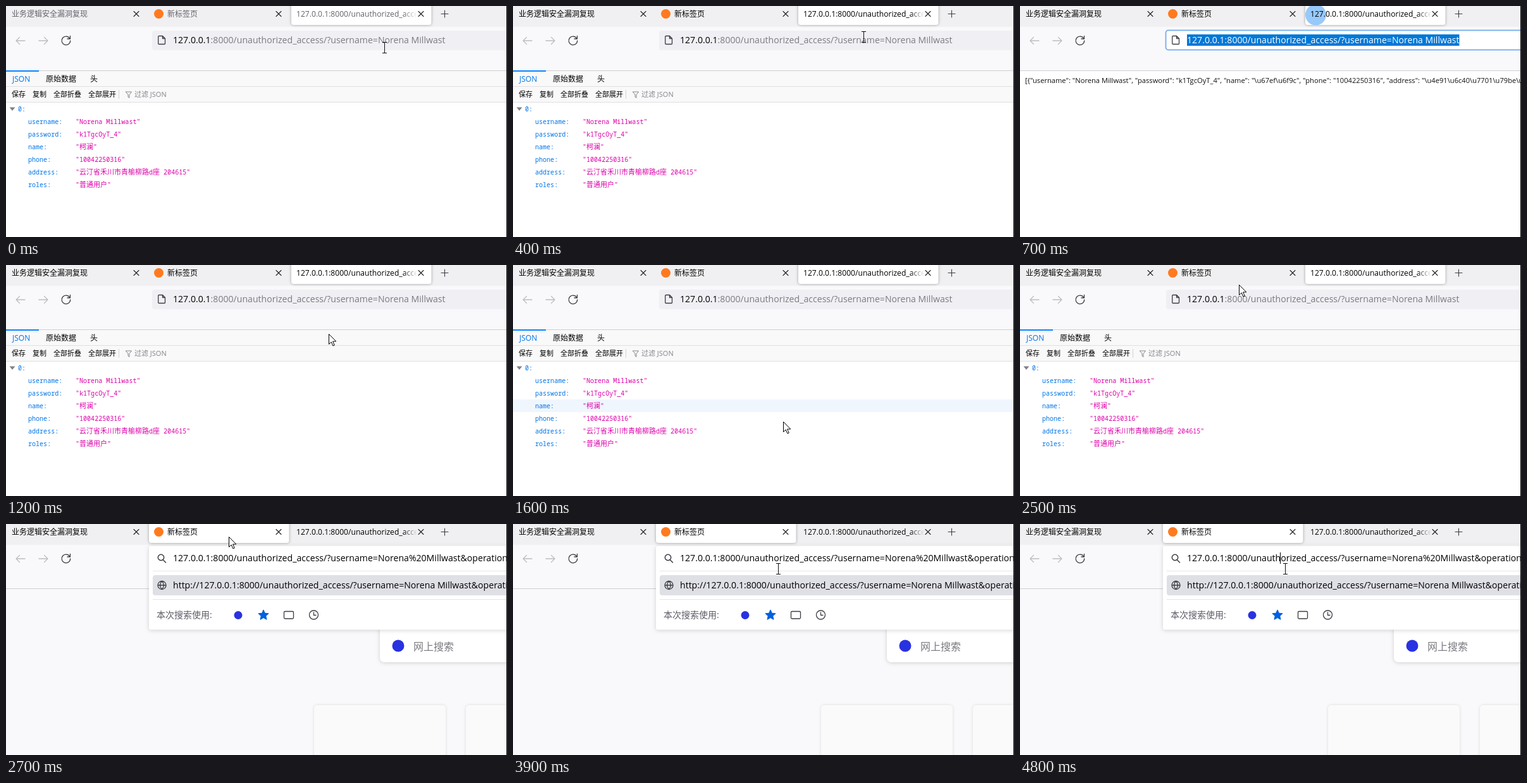
An HTML page that plays this animation: 792x366 px, repeating every 5 s.

```html
<!DOCTYPE html>
<html lang="zh-CN">
<head>
<meta charset="utf-8">
<title>JSON</title>
<style>
  html, body { margin: 0; width: 100%; height: 100%; overflow: hidden; background: #fff; }
  svg { display: block; font-family: "Open Sans", "Noto Sans CJK SC", "Noto Sans CJK", sans-serif; }
  text { white-space: pre; }
  .mono { font-family: "Noto Sans Mono", "Noto Sans CJK SC", "Noto Sans CJK", monospace; }
  .shadow { filter: drop-shadow(0 0 2px rgba(0, 0, 0, .35)); }
  .soft { filter: drop-shadow(0 1px 3px rgba(0, 0, 0, .17)); }
  .faint { filter: drop-shadow(0 0 2px rgba(0, 0, 0, .12)); }
  .icon { fill: none; stroke: #3c3c44; stroke-width: 1.3; stroke-linecap: round; stroke-linejoin: round; }
</style>
</head>
<body>
<svg id="stage" width="792" height="366" viewBox="0 0 792 366"></svg>
<script>
const INK = '#000', GRAY = '#7a7a80', BLUE = '#0074e8', PINK = '#dd00a9', SEARCH = '#2932e1';
const LOOP = 5000, STEP = 100;

const text = (x, y, s, size = 12, fill = INK, more = '') =>
  `<text x="${x}" y="${y}" font-size="${size}" fill="${fill}" ${more}>${s}</text>`;
const rect = (x, y, w, h, fill, more = '') =>
  `<rect x="${x}" y="${y}" width="${w}" height="${h}" fill="${fill}" ${more}/>`;
const icon = (d, more = '') => `<path class="icon" d="${d}" ${more}/>`;
const circle = (x, y, r, fill, more = '') => `<circle cx="${x}" cy="${y}" r="${r}" fill="${fill}" ${more}/>`;
const group = (id, body) => `<g id="${id}">${body}</g>`;

const person = 'Norena Millwast';
const phone = '10042250316';
const host = '127.0.0.1';
const path = ':8000/unauthorized_access/?username=';

const activeTab = x => rect(x, -6, 221.5, 36, '#fff', 'rx="4" class="shadow"');
const closeMark = x => icon(`M${x - 4} 8.5l8 8m0-8l-8 8`, 'style="stroke:#222;stroke-width:1.1"');

const base = rect(0, 0, 792, 366, '#fff') + rect(0, 0, 792, 33, '#f0f0f2') + rect(0, 33, 792, 69, '#f9f9fb');

const tabs = group('titles',
    text(9, 17, '业务逻辑安全漏洞复现', 12, 'inherit') +
    text(255, 17, '新标签页', 12, 'inherit') +
    `<g mask="url(#fade)">${text(459, 17, host + ':8000/unauthorized_access', 12.1, 'inherit')}</g>`) +
  [206, 431, 656].map(closeMark).join('') +
  circle(241.5, 12.5, 7.5, '#ff7a1f') +
  icon('M688 12.5h11m-5.5-5.5v11', 'style="stroke-width:1.1"');

const nav =
  icon('M30 55H16m5.5-5.5L16 55l5.5 5.5M52 55h14m-5.5-5.5L66 55l-5.5 5.5', 'style="stroke:#bdbdc2"') +
  icon('M100.5 51a6.8 6.8 0 1 0 1.2 4M101.5 47.5v4.5h-4.5') +
  rect(0, 102, 792, 1, '#cfcfd3');

const pageIcon = icon('M242 47.5h5.5l4 4v8q0 1-1 1h-8.5q-1.3 0-1.3-1v-11q0-1 1.3-1zM247.5 47.5v4h4');

const jsonRows = [
  ['username', person], ['password', 'k1TgcOyT_4'], ['name', '柯澜'], ['phone', phone],
  ['address', '云汀省禾川市青榆柳路d座 204615'], ['roles', '普通用户']
];
const wideHan = s => s.replace(/[\u4e00-\u9fff]+/g, '<tspan font-size="11">$&</tspan>');
const mono = (x, y, s, fill) => text(x, y, wideHan(s), 10.05, fill, 'class="mono"');

const jsonView =
  rect(231, 39, 570, 31, '#f0f0f4', 'rx="4"') + pageIcon +
  text(264, 59, `${host}<tspan fill="${GRAY}">${path}${person}</tspan>`, 14.1) +
  rect(0, 103, 792, 49, '#f9f9fa') + rect(0, 127, 792, 1, '#e0e0e2') + rect(0, 152, 792, 1, '#e0e0e2') +
  rect(0, 102, 52, 2, '#0a84ff') +
  text(10, 120, 'JSON', 12, BLUE) + text(63, 120, '原始数据') + text(133, 120, '头') +
  [[9, '保存'], [42, '复制'], [75, '全部折叠'], [130, '全部展开']].map(([x, s]) => text(x, 144, s, 11)).join('') +
  rect(178, 133, 1, 14, '#d4d4d8') +
  icon('M189.5 136h9l-3.5 4.5v5l-2-1.5v-3.5z', 'style="stroke:#85858b;stroke-width:1"') +
  text(203, 144, '过滤 JSON', 11, '#85858b') +
  rect(0, 173, 791, 20, '#eff6fd', 'id="hover"') +
  '<path d="M5.5 160.5h9l-4.5 5.5z" fill="#808086"/>' + mono(19, 167, '0:', BLUE) +
  jsonRows.map(([key, value], i) =>
    mono(35, 187 + 20 * i, key + ':', BLUE) + mono(110, 187 + 20 * i, `"${value}"`, PINK)).join('');

const rawJson = String.raw`[{"username": "${person}", "password": "k1TgcOyT_4", "name": "\u67ef\u6f9c", ` +
  String.raw`"phone": "${phone}", "address": "\u4e91\u6c40\u7701\u79be\u5ddd`;

const rawView =
  rect(230.5, 38.5, 570, 31, '#fff', 'rx="4" stroke="#7fb2ee" stroke-width="2"') + pageIcon +
  rect(264, 45, 430, 18, '#0078d7', 'id="selection"') +
  text(264, 59, host + path + person, 14.1, '#fff', 'id="selected"') +
  text(8, 122, rawJson, 11.15, '#111');

const starPoints = Array.from({ length: 10 }, (_, i) => {
  const r = i % 2 ? 4 : 8.5, a = i * Math.PI / 5;
  return `${407 + r * Math.sin(a)},${144.5 - r * Math.cos(a)}`;
}).join(' ');

const newTabView =
  rect(0, 103, 792, 263, '#f9f9fb') +
  rect(591, 160, 230, 59, '#fff', 'rx="7" class="soft"') +
  circle(620, 193, 9.5, SEARCH) + text(644, 200, '网上搜索', 16, GRAY) +
  [487, 727].map(x => rect(x, 287, 208, 100, '#fafafb', 'rx="5" class="faint"')).join('') +
  rect(226, 35, 590, 132.5, '#fff', 'rx="3" class="soft"') +
  icon('M248.5 57l4 4M249.7 53a4.7 4.7 0 1 1-9.4 0a4.7 4.7 0 1 1 9.4 0z', 'style="stroke-width:1.5"') +
  text(264, 59, `${host}${path}${person.replace(' ', '%20')}&amp;operation=`, 14.1) +
  rect(232, 74, 560, 1, '#e6e6ea') + rect(232, 119, 560, 1, '#e6e6ea') +
  rect(232, 81, 580, 32, '#dfdfe6', 'rx="4"') +
  icon('M253 97a6.5 6.5 0 1 1-13 0a6.5 6.5 0 1 1 13 0zM240 97h13M246.5 90.5q-6 6.5 0 13q6-6.5 0-13') +
  text(264, 102, `http://${host}${path}${person}&amp;operation=`, 14.1) +
  text(238, 149, '本次搜索使用:', 14, '#5b5b66') +
  circle(367, 144.5, 6.5, SEARCH) +
  `<polygon points="${starPoints}" fill="#0060df" stroke="#0060df" stroke-linejoin="round"/>` +
  '<rect class="icon" x="439.5" y="138.5" width="15" height="11.5" rx="1.5"/>' +
  circle(486.5, 144, 7, 'none', 'class="icon"') + icon('M486.5 140v4.5h3.5') +
  rect(411, 45, 1, 18, '#000', 'id="caret"');

const pointer = group('arrow',
    '<path d="M.5.5v16l3.7-3.5 2.7 6 2.4-1-2.7-6h5.2z" fill="#fff" stroke="#000"/>') +
  group('beam', '<path d="M-3-8.500h7M-3 8.500h7M.5-8.500v17" fill="none" stroke="#111"/>');

stage.innerHTML =
  `<defs><linearGradient id="ramp" gradientUnits="userSpaceOnUse" x1="628" x2="650">
    <stop stop-color="#fff"/><stop offset="1" stop-color="#000"/></linearGradient>
    <mask id="fade" maskUnits="userSpaceOnUse" x="450" y="0" width="210" height="30">
    <rect x="450" width="210" height="30" fill="url(#ramp)"/></mask></defs>` +
  base + nav +
  group('tabThree', activeTab(451)) + group('tabTwo', activeTab(226)) +
  circle(467.5, 14, 16.5, '#98c9fb', 'id="ring"') + tabs +
  group('json', jsonView) + group('raw', rawView) + group('newTab', newTabView) +
  group('cursor', pointer) + rect(791, 0, 1, 366, '#111');

const el = id => document.getElementById(id);
const show = (id, on) => { el(id).style.display = on ? '' : 'none'; };
el('selection').setAttribute('width', el('selected').getComputedTextLength());

// time, x, y
const route = [
  [0, 598, 66], [300, 598, 66], [600, 467, 15], [800, 467, 15], [1200, 510, 109], [1400, 480, 190],
  [1700, 400, 277], [1900, 345, 182], [2000, 318, 87], [2600, 352, 20], [3000, 352, 20],
  [3400, 412, 64], [3600, 412, 64], [3900, 419, 71], [LOOP, 419, 71]
];

function positionAt(t) {
  const i = Math.max(1, route.findIndex(k => k[0] >= t));
  const [t0, x0, y0] = route[i - 1], [t1, x1, y1] = route[i];
  const p = (t - t0) / (t1 - t0);
  return [Math.round(x0 + (x1 - x0) * p), Math.round(y0 + (y1 - y0) * p)];
}

const within = (t, from, to) => t >= from && t < to;

function draw(now) {
  const t = Math.floor(now % LOOP / STEP) * STEP;
  const isRaw = within(t, 600, 900), isNewTab = t >= 2700;
  show('raw', isRaw);
  show('newTab', isNewTab);
  show('json', !isRaw && !isNewTab);
  show('tabTwo', isNewTab);
  show('tabThree', !isNewTab);
  el('titles').setAttribute('fill', t < 300 ? '#62626a' : INK);

  const clicking = within(t, 600, 800);
  show('ring', clicking);
  show('cursor', !clicking && !within(t, 100, 300));
  const [x, y] = positionAt(t), overField = within(y, 38, 72);
  el('cursor').setAttribute('transform', `translate(${x} ${y})`);
  show('arrow', !overField);
  show('beam', overField);

  // The row highlight trails the pointer by one step.
  const row = Math.floor((positionAt(Math.max(0, t - STEP))[1] - 153) / 20);
  show('hover', row >= 0);
  el('hover').setAttribute('y', 153 + 20 * row);

  show('caret', within(t, 4100, 4300) || t >= 4800);
}

const start = performance.now();
function tick() {
  draw(performance.now() - start);
  requestAnimationFrame(tick);
}
tick();
</script>
</body>
</html>
```
